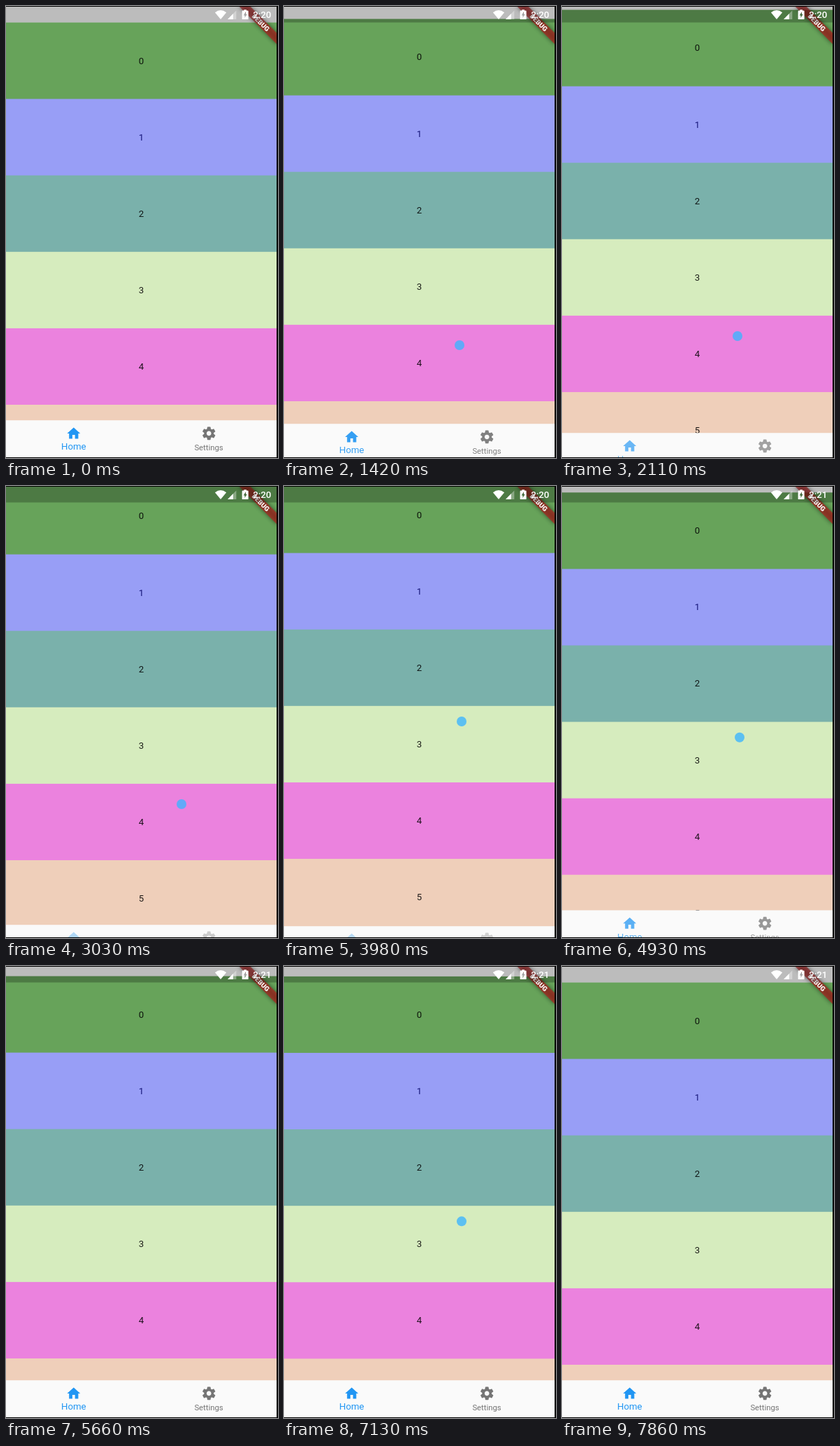
These frames come from a looping animation (389x645 px, 9260 ms). An HTML page:

```html
<!DOCTYPE html>
<html lang="en">
<head>
<meta charset="utf-8">
<title>Scroll to hide</title>
<style>
  html, body { margin: 0; width: 100%; height: 100%; overflow: hidden; background: #000; }
  svg { display: block; width: 389px; height: 645px; }
  text { font-family: Roboto, sans-serif; text-anchor: middle; }
  #list text { font-size: 13.2px; }
</style>
</head>
<body>
<svg viewBox="0 0 389 645">
  <defs>
    <clipPath id="screen"><rect y="1" width="387" height="643"/></clipPath>
    <filter id="blur" x="-50%" y="-150%" width="200%" height="400%"><feGaussianBlur stdDeviation="3.4"/></filter>
    <path id="tooth" d="M-1.9-10h3.8q.5 0 .6.5l.6 4h-6.2l.6-4q.1-.5.6-.5z"/>
  </defs>
  <g clip-path="url(#screen)">
    <rect width="387" height="645" fill="#fafafa"/>
    <g id="list"></g>

    <g id="bar">
      <rect y="591.2" width="387" height="60" fill="#fafafa"/>
      <g id="tabs">
        <g fill="#2196f3">
          <path transform="translate(96.8 610) scale(.9406) translate(-12 -12)" d="M10 20v-6h4v6h5v-8h3L12 3 2 12h3v8z"/>
          <text x="96.8" y="633.3" font-size="13.2">Home</text>
        </g>
        <g fill="#757575">
          <g id="gear" transform="translate(290.2 609.9) scale(.9406)">
            <circle r="5.4" fill="none" stroke="#757575" stroke-width="3.8"/>
          </g>
          <text x="290" y="634" font-size="11.3">Settings</text>
        </g>
      </g>
    </g>

    <g transform="translate(387 1) rotate(45) scale(.9406)">
      <rect x="-40" y="28" width="80" height="12" opacity=".5" filter="url(#blur)"/>
      <rect x="-40" y="28" width="80" height="12" fill="#b71c1c" fill-opacity=".63"/>
      <text y="37.7" font-size="10.2" font-weight="900" fill="#fff">DEBUG</text>
    </g>

    <rect y="1" width="387" height="22.5" opacity=".25"/>
    <g fill="#fff">
      <path d="M298.9 9.3Q307 2.9 315.1 9.3L307 19z"/>
      <path d="M317 19H329.3V6.4z" opacity=".35"/>
      <path d="M317 19H324.8V11z"/>
      <path fill-rule="evenodd" d="M340.3 6.4V5.2h3.6v1.2h1.8q.9 0 .9.9v10.9q0 .9-.9.9h-7.2q-.9 0-.9-.9V7.3q0-.9.9-.9zM342.9 8.2l-3.3 5.2h1.8v3.6l3.3-5.3h-1.8z"/>
      <text id="clock" x="366.3" y="17.2" font-size="13.2" font-weight="500">2:20</text>
    </g>
    <circle id="touch" r="7" fill="#3cb4ff" fill-opacity=".79"/>
  </g>
</svg>
<script>
const LOOP = 9260, TOP = 23.5, ROW = 109.1, BAR = 52.7;
const RELEASE = 5300, SNAP = 360, MINUTE = 4930;
const colors = ['#67a35a', '#989ef6', '#7ab1ab', '#d6ecbe', '#eb82de', '#efcfba'];

// The finger sits at y - offset; path holds [time, offset]
const drags = [
  { x: 251, y: 489, path: [[1154, 0], [2110, 18], [2590, 35], [3030, 35], [3350, 37]] },
  { x: 254, y: 373, path: [[3980, 37], [4310, 23], [RELEASE, 9]] },
  { x: 254, y: 373, path: [[7130, 9], [7860, -260]] }
];

const $ = id => document.getElementById(id);
const clamp = v => Math.min(1, Math.max(0, v));
const move = (el, x, y) => el.setAttribute('transform', `translate(${x} ${y})`);

function add(parent, tag, attrs) {
  const el = document.createElementNS('http://www.w3.org/2000/svg', tag);
  for (const k in attrs) el.setAttribute(k, attrs[k]);
  return parent.appendChild(el);
}

function along(path, t) {
  return path.slice(1).reduce((v, [end, to], i) => {
    const [start, from] = path[i];
    return v + (to - from) * clamp((t - start) / (end - start));
  }, path[0][1]);
}

// Each row runs slightly under the next one
colors.forEach((fill, i) => {
  const y = TOP + i * ROW;
  add($('list'), 'rect', { y, width: 387, height: ROW + 1, fill });
});
colors.forEach((_, i) => {
  const ink = i === 1 ? '#16167a' : 'rgba(0,0,0,.87)';
  add($('list'), 'text', { x: 193.5, y: TOP + i * ROW + 59, fill: ink }).textContent = i;
});
for (let a = 0; a < 360; a += 60) add($('gear'), 'use', { href: '#tooth', transform: `rotate(${a})` });

function draw(t) {
  const drag = drags.filter(d => d.path[0][0] <= t).pop() || drags[0];
  const pull = along(drag.path, t);
  const offset = Math.max(0, pull);
  const hidden = offset * (1 - clamp((t - RELEASE) / SNAP));

  move($('list'), 0, -offset);
  move($('bar'), 0, hidden);
  $('tabs').setAttribute('opacity', 1 - hidden / BAR);
  $('clock').textContent = t < MINUTE ? '2:20' : '2:21';

  const down = t >= drag.path[0][0] && t < drag.path.at(-1)[0];
  $('touch').setAttribute('visibility', down ? 'visible' : 'hidden');
  move($('touch'), drag.x, drag.y - pull);
}

const start = performance.now();
function tick() {
  draw((performance.now() - start) % LOOP);
  requestAnimationFrame(tick);
}
tick();
</script>
</body>
</html>
```
